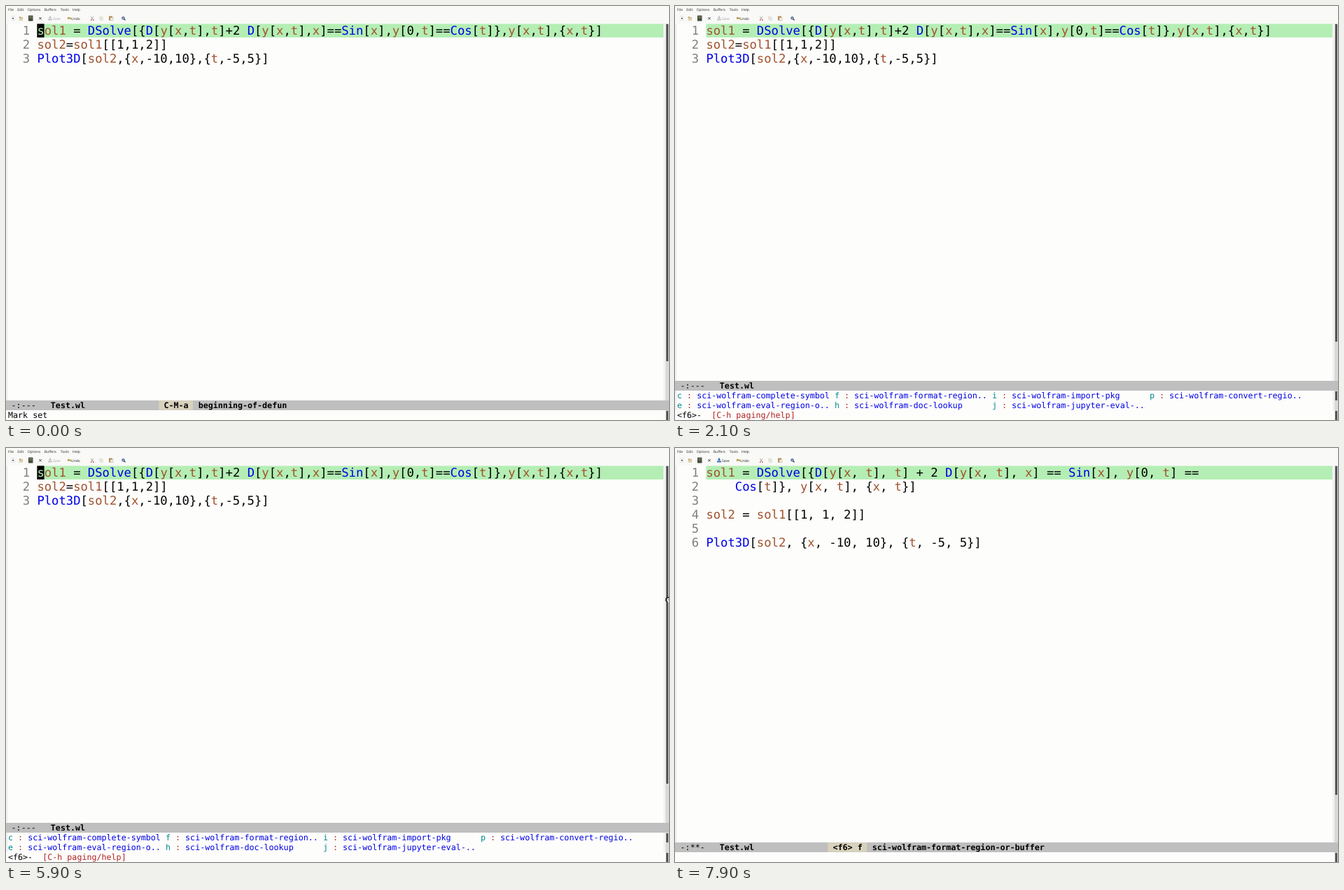
An HTML page for the animation above (8000 ms loop, 947 px wide and 592 px high).

```html
<!DOCTYPE html>
<html lang="en">
<head>
<meta charset="utf-8">
<title>Formatting a buffer</title>
<style>
  html, body { margin: 0; width: 100%; height: 100%; overflow: hidden; background: #fdfdfc; }
  svg { display: block; width: 947px; height: 592px; }
  text { white-space: pre; text-rendering: geometricPrecision; }
  .code { font: 17.2px "DejaVu Sans Mono", monospace; }
  .small { font: 11.68px "DejaVu Sans Mono", monospace; }
  .ui { font: 5px "Noto Sans", sans-serif; fill: #333; }
  .bold { font-weight: bold; }
  .fn { fill: #0000e6; }
  .var { fill: #a0522d; }
  .num { fill: #7f7f7f; }
  .key { fill: #008b8b; }
  .sep { fill: #b22222; }

  /* one 8 s timeline with hard cuts */
  .cut { animation: 8s step-end infinite; }
  #before { animation-name: before; }
  #idle { animation-name: idle; }
  #mark { animation-name: mark; }
  #prefix { animation-name: prefix; }
  #hints { animation-name: hints; }
  #after { animation-name: after; }
  #caret { animation-name: caret; }
  #busy { animation-name: busy; }
  #ring { animation: spin .96s -.86s linear infinite; transform-origin: 946px 217px; }
  @keyframes before { 0% { opacity: 1 } 90%, 100% { opacity: 0 } }
  @keyframes idle { 0% { opacity: 1 } 25%, 100% { opacity: 0 } }
  @keyframes mark { 0% { opacity: 1 } 10%, 100% { opacity: 0 } }
  @keyframes prefix { 0% { opacity: 0 } 10% { opacity: 1 } 25%, 100% { opacity: 0 } }
  @keyframes hints { 0% { opacity: 0 } 25% { opacity: 1 } 90%, 100% { opacity: 0 } }
  @keyframes after { 0% { opacity: 0 } 90%, 100% { opacity: 1 } }
  @keyframes busy { 0% { opacity: 0 } 50% { opacity: 1 } 90%, 100% { opacity: 0 } }
  @keyframes caret {
    0%, 15%, 27.5%, 37.5% { opacity: 1 }
    7.5%, 21.25%, 33.75%, 97.5%, 100% { opacity: 0 }
  }
  @keyframes spin { to { transform: rotate(360deg) } }
</style>
</head>
<body>
<svg viewBox="0 0 947 592">
  <rect width="947" height="592" fill="#fdfdfc"/>
  <rect width="947" height="25" fill="#f9f9f8"/>
  <path d="M0 25h3v553h-3zM939 25h3v553h-3z" fill="#f2f2f2"/>
  <rect x="942" y="25" width="5" height="567" fill="#d9d9d9"/>
  <rect x="44.4" y="25.5" width="894.6" height="19.5" fill="#b4eeb4"/>

  <g class="ui" id="menu"></g>
  <g class="ui" id="tools">
    <path d="M8 14.5h4v6h-4z" fill="#fff" stroke="#ccc" stroke-width=".5"/>
    <circle cx="10" cy="17.7" r="1.1" fill="#555"/>
    <path d="M18.8 15h2l.7 1h2.5v4.5h-5.2z" fill="#c9b48a"/>
    <path d="M19.5 17.5h5l-.7 3h-5z" fill="#e3d3b0"/>
    <rect x="32" y="13.5" width="6.5" height="8" rx=".6" fill="#454a3c"/>
    <path d="M33 15h4.5M33 17h4.5" stroke="#8c9a6c" stroke-width=".8"/>
    <path d="M47.3 16l3.4 3.4m0-3.4l-3.4 3.4" stroke="#444" stroke-width="1"/>
    <path d="M92 20c2-3 0-4-2.500-3.200v-1.500l-2 2.300 2 2v-1.400c1.500-.5 2.500 0 2.500 1.800z" fill="#b08a28"/>
    <text x="93" y="19.500">Undo</text>
    <path d="M121.200 15l3 4m.8-4l-3 4" stroke="#888" stroke-width=".7"/>
    <path d="M121 20h1.500m1.500 0h1.500" stroke="#d03030" stroke-width="1.400"/>
    <path d="M133.500 15h3.500v4h-3.500zM135 16.500h3.500v4h-3.500z" fill="#f2f2ea" stroke="#ccccc0" stroke-width=".5"/>
    <rect x="147" y="14.500" width="5" height="6" fill="#b98d4e"/>
    <path d="M149 16.500h4v4h-4z" fill="#f3f0e6" stroke="#999" stroke-width=".4"/>
    <circle cx="167.500" cy="17.300" r="1.800" fill="#9db4dd" stroke="#2d3f75" stroke-width=".9"/>
    <path d="M168.800 18.600l1.700 1.700" stroke="#222" stroke-width="1.200"/>
  </g>

  <g id="before" class="cut"></g>
  <g id="idle" class="cut"></g>
  <g id="mark" class="cut"></g>
  <g id="prefix" class="cut"></g>
  <g id="hints" class="cut"></g>
  <g id="after" class="cut"></g>
  <g id="caret" class="cut">
    <rect x="44.400" y="25.500" width="10.200" height="19.500"/>
    <text class="code" x="44.400" y="41.300" fill="#b4eeb4">s</text>
  </g>
  <g id="busy" class="cut">
    <circle cx="946" cy="217" r="3.800" fill="#fff" stroke="#bbb" stroke-width=".6"/>
    <g id="ring">
      <path d="M946 213.800a3.200 3.200 0 0 0 0 6.400" fill="none" stroke="#111" stroke-width="1.800"/>
    </g>
    <circle cx="946" cy="217" r="1" fill="#888"/>
  </g>
</svg>
<script>
const COL = 10.355, CELL = 7.03;
const add = (id, markup) => document.getElementById(id).insertAdjacentHTML("beforeend", markup);
const escape = s => s.replace(/&/g, "&amp;").replace(/</g, "&lt;");
const span = (cls, s) => `<tspan class="${cls}">${escape(s)}</tspan>`;
const text = (cls, x, y, body) => `<text class="${cls}" x="${x}" y="${y}">${body}</text>`;
const rect = (x, y, w, h, fill) => `<rect x="${x}" y="${y}" width="${w}" height="${h}" fill="${fill}"/>`;
const thumb = (y, h) => rect(943, y, 3, h, "#555");

const highlight = line => line.replace(/[a-z]\w*/gi, w => span(/^[A-Z]/.test(w) ? "fn" : "var", w));

const listing = lines => lines.map((line, i) => {
  const y = 41.3 + i * 20;
  return text("code num", 3 + 2 * COL, y, i + 1) + text("code", 3 + 4 * COL, y, highlight(line));
}).join("");

function modeLine(y, flags, key, command) {
  const at = (col, cls, s) => text(cls, 7.6 + col * CELL, y + 11.2, escape(s));
  let out = rect(0, y, 947, 14, "#bfbfbf") + at(0, "small", flags) + at(8, "small bold", "Test.wl");
  if (key) {
    out += rect(218.3, y + .3, (key.length + 2) * CELL - .5, 13.4, "#d8d2bc")
      + at(31, "small bold", key) + at(33 + key.length, "small bold", command);
  }
  return out;
}

const save = (ink, icon) =>
  `<path d="M60 18.500h6v2h-6zM62 14.500h2v2h1.500l-2.500 2-2.500-2h1.500z" fill="${icon}"/>` +
  `<text class="ui" x="67" y="19.500" style="fill:${ink}">Save</text>`;

[["File", 3], ["Edit", 16.3], ["Options", 30.7], ["Buffers", 54.8], ["Tools", 77.8], ["Help", 95]]
  .forEach(([label, x]) => add("menu", text("ui", x, 7, label)));

add("before", save("#aaa", "#c4c4c4") + listing([
  "sol1 = DSolve[{D[y[x,t],t]+2 D[y[x,t],x]==Sin[x],y[0,t]==Cos[t]},y[x,t],{x,t}]",
  "sol2=sol1[[1,1,2]]",
  "Plot3D[sol2,{x,-10,10},{t,-5,5}]"
]));

add("idle", thumb(26, 482) + modeLine(564, "-:---", "C-M-a", "beginning-of-defun") + thumb(579, 13));
add("mark", text("small", 3, 589, "Mark set"));
add("prefix", rect(38, 579, 21.300, 12.500, "#f0f0f4") +
  text("small", 3, 589, `f6- (<tspan fill="#00008b">C-h</tspan> for help)`));

const hints = [
  ["c", "complete-symbol"], ["e", "eval-region-o.."],
  ["f", "format-region.."], ["h", "doc-lookup"],
  ["i", "import-pkg"], ["j", "jupyter-eval-.."],
  ["p", "convert-regio.."]
];
add("hints", thumb(26, 454) + modeLine(536, "-:---") + thumb(551, 13) + thumb(579, 13) +
  hints.map(([key, name], i) => text("small", 3 + (i >> 1) * 32 * CELL, 561 + i % 2 * 14,
    span("key", key) + span("sep", " : ") + span("fn", "sci-wolfram-" + name))).join("") +
  text("small", 3, 589, escape("<f6>-  ") + span("sep", "[C-h paging/help]")));

add("after", save("#333", "#3f6fb5") + listing([
  "sol1 = DSolve[{D[y[x, t], t] + 2 D[y[x, t], x] == Sin[x], y[0, t] ==",
  "    Cos[t]}, y[x, t], {x, t}]",
  "",
  "sol2 = sol1[[1, 1, 2]]",
  "",
  "Plot3D[sol2, {x, -10, 10}, {t, -5, 5}]"
]) + thumb(26, 470) + modeLine(564, "-:**-", "<f6> f", "sci-wolfram-format-region-or-buffer") + thumb(579, 13));
</script>
</body>
</html>
```
